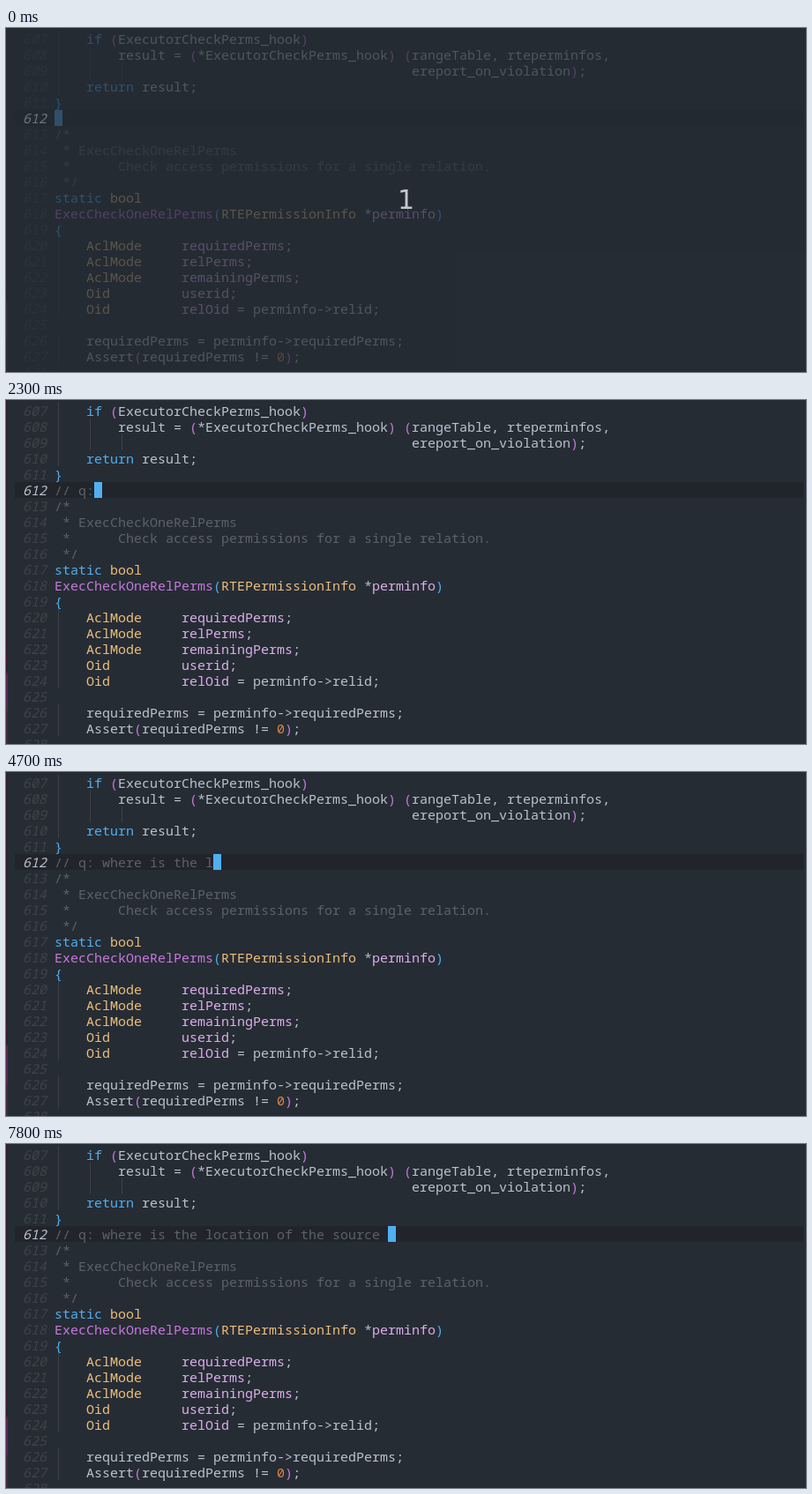
An HTML page for the animation above (8 s loop, 907 by 390 pixels).

```html
<!DOCTYPE html>
<html lang="en">
<head>
<meta charset="utf-8">
<title>Typing a comment in an editor</title>
<style>
  html, body { margin: 0; width: 100%; height: 100%; overflow: hidden; background: #262c34; }
  #stage { position: relative; width: 907px; height: 390px; overflow: hidden; background: #262c34; }
  #stage > * { position: absolute; margin: 0; }
  pre { font: 15px/18px "Noto Sans Mono", "DejaVu Sans Mono", monospace; font-variant-ligatures: none; color: #bbc2cf; }
  #edge { left: 0; top: 0; width: 2px; height: 390px;
    background: linear-gradient(#35202f 0 285px, #4a1838 290px, #2c2230 308px, #5b2a50 312px 350px, #43283f 355px); }
  #current { left: 10px; top: 93px; width: 894px; height: 18px; background: #21242b; }
  #numbers { left: 19px; top: 3px; color: #3f444a; font-style: italic; }
  #code { left: 55px; top: 3px; }
  .guide { width: 1px; background: #3c4148; }
  k { color: #51afef; }
  y { color: #ecbe7b; }
  v { color: #dcaeea; }
  m { color: #c678dd; }
  o { color: #da8548; }
  c { color: #5b6268; }
  #cursor, #ghost { display: inline-block; height: 18px; vertical-align: top; }
  #cursor { width: 9px; background: #51afef; color: #21242b; }
  #ghost { background: #262a31; }
  #veil { inset: 0; background: #252c34b8; }
  #lineNumber { left: 19px; top: 93px; color: #bbc2cf; font-style: italic; }
  #count { left: 0; top: 177px; width: 907px; text-align: center; color: #c3c7ce;
    font: 30px/36px "DejaVu Sans", sans-serif; }
</style>
</head>
<body>
<div id="stage">
  <div id="edge"></div>
  <div id="current"></div>
  <pre id="numbers"></pre>
<pre id="code">
    <k>if</k> <m>(</m>ExecutorCheckPerms_hook<m>)</m>
        result = <m>(</m>*ExecutorCheckPerms_hook<m>)</m> <m>(</m>rangeTable, rteperminfos,
                                             ereport_on_violation<m>)</m>;
    <k>return</k> result;
<k>}</k>
<c><span id="typed"></span><span id="cursor"></span><span id="ghost"></span></c>
<c>/*
 * ExecCheckOneRelPerms
 *      Check access permissions for a single relation.
 */</c>
<k>static</k> <y>bool</y>
<m>ExecCheckOneRelPerms</m><k>(</k><y>RTEPermissionInfo</y> *<v>perminfo</v><k>)</k>
<k>{</k>
    <y>AclMode</y>     <v>requiredPerms</v>;
    <y>AclMode</y>     <v>relPerms</v>;
    <y>AclMode</y>     <v>remainingPerms</v>;
    <y>Oid</y>         <v>userid</v>;
    <y>Oid</y>         <v>relOid</v> = perminfo->relid;

    requiredPerms = perminfo->requiredPerms;
    Assert<m>(</m>requiredPerms != <o>0</o><m>)</m>;
</pre>
  <div id="veil"></div>
  <pre id="lineNumber">612</pre>
  <div id="count">1</div>
</div>
<script>
const $ = id => document.getElementById(id);
const LOOP = 8000, FIRST_LINE = 607, CURRENT_LINE = 612, LINE = 18, CELL = 9;

$('numbers').textContent = Array.from({ length: 22 }, (_, i) =>
  FIRST_LINE + i === CURRENT_LINE ? '' : FIRST_LINE + i).join('\n');

// Indent guides: column, first line, number of lines
for (const [column, line, count] of [[0, 607, 4], [4, 608, 2], [8, 609, 1], [0, 620, 5], [0, 626, 2]]) {
  const guide = document.createElement('div');
  guide.className = 'guide';
  guide.style.cssText = `left:${59 + column * CELL}px;top:${3 + (line - FIRST_LINE) * LINE}px;height:${count * LINE}px`;
  $('stage').insertBefore(guide, $('code'));
}

const SLASHES = '/'.repeat(2);
const TEXT = SLASHES + ' q: where is the location of the source ';
const MISTYPED = SLASHES + ' q;';

// Time in ms and the number of characters typed by then
const KEYS = [
  [0, 0], [500, 1], [600, 2], [800, 3], [1000, 4], [1500, 5], [2000, 4], [2300, 5],
  [2600, 6], [2900, 7], [3100, 8], [3300, 10], [3500, 12], [3800, 13], [3900, 14],
  [4100, 15], [4300, 16], [4400, 17], [4500, 18], [4600, 19], [4700, 20], [4900, 22],
  [5000, 23], [5200, 24], [5300, 25], [5400, 26], [5500, 27], [5600, 28], [5800, 29],
  [5900, 30], [6000, 31], [6300, 32], [6400, 33], [6500, 34], [6600, 35], [7100, 36],
  [7200, 37], [7300, 38], [7400, 39], [7600, 40], [7800, 42],
];

function suggestion(t) {
  if (t >= 3500 && t < 4500) return SLASHES + ' q: where is this called?';
  if (t >= 4600 && t < 4700) return SLASHES + ' q: where is the function?';
  return '';
}

function draw(t) {
  const length = KEYS.findLast(([time]) => time <= t)[1];
  const rest = suggestion(t).slice(length);
  $('typed').textContent = t >= 1500 && t < 2000 ? MISTYPED : TEXT.slice(0, length);
  $('cursor').textContent = rest[0] || ' ';
  $('ghost').textContent = rest.slice(1);

  const counting = t < 100;
  $('veil').hidden = $('count').hidden = !counting;
  $('lineNumber').style.opacity = counting ? 0.5 : 1;
}

const start = performance.now();
function tick() {
  draw((performance.now() - start) % LOOP);
  requestAnimationFrame(tick);
}
draw(0);
requestAnimationFrame(tick);
</script>
</body>
</html>
```
